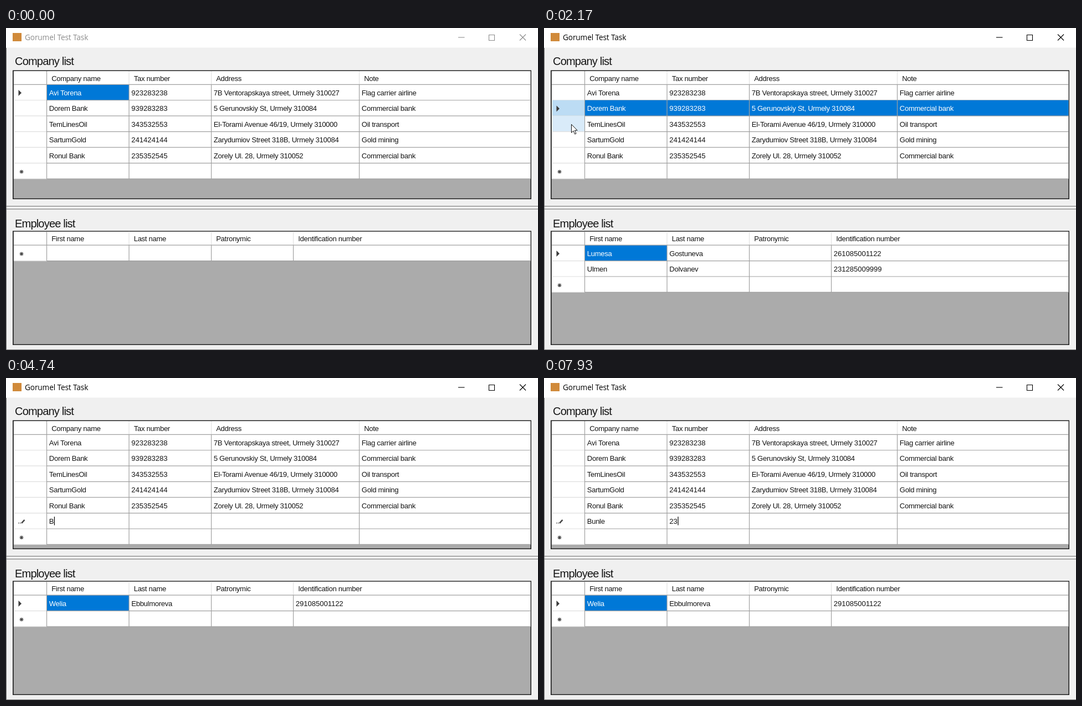
Write an HTML page that moves like this. It is 960 by 583 pixels and loops after 8 s.

```html
<!DOCTYPE html>
<html lang="en">
<head>
<meta charset="utf-8">
<title>Company and employee lists</title>
<style>
  html, body { margin: 0; width: 100%; height: 100%; overflow: hidden; background: #f0f0f0; }
  svg { display: block; width: 100vw; height: 100vh; }
  text { font: 13px "Liberation Sans", Arial, sans-serif; letter-spacing: -0.27px; fill: #141414; white-space: pre; }
  .num { letter-spacing: 0; }
  .head { font-size: 20px; letter-spacing: -0.8px; }
  .title { font: 13.6px "Open Sans", "Noto Sans", sans-serif; letter-spacing: -0.1px; }
  .on { fill: #fff; }
</style>
</head>
<body>
<svg id="stage" viewBox="0 0 960 583" preserveAspectRatio="none"></svg>
<script>
const LOOP = 8000, PITCH = 28.45, LEFT = 14, DIVIDER = 73.5, RIGHT = 946.5;
const BLUE = '#0078d7', LINE = '#a0a0a0', HOVER = '#d9ebf9', PICKED = '#bcdcf4';
const stage = document.getElementById('stage');

const companies = {
  top: 78, bottom: 309.5, cols: [DIVIDER, 222, 370.5, 637.5],
  heads: ['Company name', 'Tax number', 'Address', 'Note'],
  rows: [
    ['Avi Torena', '923283238', '7B Ventorapskaya street, Urmely 310027', 'Flag carrier airline'],
    ['Dorem Bank', '939283283', '5 Gerunovskiy St, Urmely 310084', 'Commercial bank'],
    ['TemLinesOil', '343532553', 'El-Torami Avenue 46/19, Urmely 310000', 'Oil transport'],
    ['SartumGold', '241424144', 'Zarydumiov Street 318B, Urmely 310084', 'Gold mining'],
    ['Ronul Bank', '235352545', 'Zorely Ul. 28, Urmely 310052', 'Commercial bank']
  ]
};
const staff = {
  top: 368.8, bottom: 573.5, cols: [DIVIDER, 222, 370.5, 518.5],
  heads: ['First name', 'Last name', 'Patronymic', 'Identification number']
};
const teams = [
  [],
  [['Vrena', 'Beldatova', '', '211085001122'],
   ['Belnur', 'Durbamelkeniov', '', '211285009999'],
   ['Ulmen', 'Tumerov', '', '231085001342']],
  [['Lumesa', 'Gostuneva', '', '261085001122'],
   ['Ulmen', 'Dolvanev', '', '231285009999']],
  [['Welia', 'Ebbulmoreva', '', '291085001122']]
];
const teamTimes = [[0, 0], [1100, 1], [1840, 2], [2300, 3]];

// time, row, column (-1 selects the whole row)
const picks = [[0, 0, 0], [1060, 0, -1], [1790, 1, -1], [2260, 2, -1],
  [3570, 5, 0], [5900, 6, 0], [7140, 5, 1]];

// time, text in the editor, mode
const edits = [[0, null], [4170, '', 'caret'], [4600, ''], [4740, 'B', 'caret'], [5110, 'B'],
  [5250, 'Bu', 'caret'], [5340, 'Bun', 'caret'], [5480, 'Bunl', 'caret'], [5530, 'Bunle', 'caret'],
  [5900, null], [7280, '0', 'marked'], [7740, '2', 'caret'], [7930, '23', 'caret']];

// first step, last step, number of steps, end point
const moves = [
  [180, 180, 1, 794, 560], [230, 680, 10, 28, 109], [870, 920, 2, 45, 121],
  [1560, 1700, 4, 53, 150], [2020, 2170, 4, 49, 174],
  [3190, 3190, 1, 71, 203], [3240, 3430, 5, 106, 263], [3660, 3710, 2, 111, 235], [3850, 3940, 2, 128, 245],
  [6600, 6600, 1, 128, 245], [6650, 6740, 3, 160, 272], [6790, 6900, 3, 258, 261], [6950, 7050, 3, 258, 258]
];
const shapes = [[0, 'none'], [180, 'arrow'], [4170, 'beam'], [4260, 'none'],
  [6600, 'arrow'], [7370, 'beam'], [7790, 'none']];

const at = (table, t) => table.filter(step => step[0] <= t).pop();

function pointer(t) {
  let x = 0, y = 0;
  for (const [from, to, n, endX, endY] of moves) {
    if (t < from) break;
    const done = t >= to ? n : 1 + Math.floor((t - from) / (to - from) * (n - 1) + 1e-6);
    x += (endX - x) * done / n;
    y += (endY - y) * done / n;
  }
  return { x, y, shape: at(shapes, t)[1] };
}

const box = (x, y, w, h, fill) => `<rect x="${x}" y="${y}" width="${w}" height="${h}" fill="${fill}"/>`;
const path = (d, stroke, width = 1.2, fill = 'none') =>
  `<path d="${d}" stroke="${stroke}" stroke-width="${width}" fill="${fill}"/>`;
const label = (x, y, s, cls = '') =>
  s ? `<text x="${x}" y="${y}" class="${cls}${/^\d+$/.test(s) ? ' num' : ''}">${s}</text>` : '';

const triangle = (x, y) => path(`M${x} ${y - 5}l5.5 5.5l-5.5 5.5z`, 'none', 0, '#3c3c3c');
const star = (x, y) => path(`M${x - 3.5} ${y}h7M${x} ${y - 3.5}v7M${x - 2.6} ${y - 2.6}l5.2 5.2M${x + 2.6} ${y - 2.6}l-5.2 5.2`, '#4a4a4a');
const pencil = y => box(22, y + 2.5, 1.5, 1.5, '#444') + box(25, y + 2.5, 1.5, 1.5, '#444') +
  path(`M28 ${y + 3.5}l5.5 -6`, '#444', 2.4);

function marker(kind, y) {
  if (kind === 'current') return triangle(22.5, y);
  if (kind === 'new') return star(28, y + 1);
  if (kind === 'both') return triangle(22, y) + star(31.5, y + 0.5);
  return kind === 'edit' ? pencil(y) : '';
}

function grid(g, rows, { row, col, hover = -1, edit = null, mode, marks }) {
  const first = g.top + 24.3, y = i => first + i * PITCH, end = y(rows.length);
  const edge = i => g.cols[i] ?? RIGHT;
  let out = box(12, g.top - 1.5, 936, g.bottom - g.top + 2, '#222') +
    box(LEFT - 0.3, g.top, RIGHT - LEFT + 0.2, g.bottom - g.top - 1, '#ababab') +
    box(LEFT, g.top, RIGHT - LEFT, end - g.top, '#fff');

  g.heads.forEach((s, i) => {
    out += label(g.cols[i] + 8.7, g.top + 17.5, s);
    out += path(`M${g.cols[i]} ${g.top}V${first}`, i ? '#e2e2e2' : LINE);
  });

  rows.forEach((cells, r) => {
    const whole = r === row && col < 0;
    if (whole || r === hover) out += box(LEFT + 1, y(r), DIVIDER - LEFT - 1, PITCH, whole ? PICKED : HOVER);
    out += marker(marks[r], y(r) + 14.8);
    cells.forEach((s, c) => {
      const here = r === row && (col < 0 || c === col), editing = here && edit !== null;
      const x = g.cols[c] + 4.3, on = here && !editing;
      if (on) out += box(g.cols[c], y(r), edge(c + 1) - g.cols[c], PITCH, BLUE);
      if (editing && mode === 'marked') out += box(x, y(r) + 6.5, 8, 16, BLUE);
      const text = editing ? edit : s;
      out += label(x, y(r) + 19.5, text, (on || editing && mode === 'marked' ? 'on' : '') + (editing ? ' editor' : ''));
      if (editing && mode === 'caret') out += `<rect class="caret" x="${x + 0.5}" y="${y(r) + 6.5}" width="1.2" height="15.5"/>`;
    });
    out += path(`M${LEFT + 1} ${y(r + 1)}H${DIVIDER}`, '#dedede') + path(`M${DIVIDER} ${y(r + 1)}H${RIGHT}`, LINE);
  });

  out += path(`M${LEFT} ${first}H${RIGHT}`, LINE);
  return out + g.cols.map(x => path(`M${x} ${first}V${end}`, LINE)).join('');
}

function cursor({ x, y, shape }) {
  if (shape === 'none') return '';
  let art;
  if (shape === 'beam') art = path('M-3 -8h2.3l.7 .8l.7 -.8h2.3M0 -7.2v14.4M-3 8h2.3l.7 -.8l.7 .8h2.3', '#111', 1.1);
  else if (shape === 'resize') art = path('M-9 0l5 -4.5v3h8v-3l5 4.5l-5 4.5v-3h-8v3z', '#111', 1, '#fff');
  else art = path('M.5 .5v15l3.5 -3.3l2.6 6l2.4 -1l-2.6 -5.9h4.7z', '#111', 1, '#fff');
  return `<g transform="translate(${x.toFixed(1)} ${y.toFixed(1)})">${art}</g>`;
}

function companyGrid(t, p) {
  const [, row, col] = at(picks, t), [, edit, mode] = at(edits, t);
  const rows = companies.rows.slice();
  const grown = t >= 4740;
  if (grown) rows.push(['Bunle', t >= 5950 ? '0' : '', '', '']);
  rows.push(['', '', '', '']);

  const last = rows.length - 1, marks = { [last]: 'new' };
  const typing = edit !== null && grown && mode !== 'marked';
  marks[row] = typing ? 'edit' : row === last ? 'both' : 'current';

  const inHeads = p.shape === 'arrow' && p.x > LEFT && p.x < DIVIDER;
  const under = Math.floor((p.y - companies.top - 24.3) / PITCH);
  const hover = inHeads && under >= 0 && under < rows.length ? under : -1;
  if (hover >= 0 && Math.abs(p.x - DIVIDER) < 5) p.shape = 'resize';
  return grid(companies, rows, { row, col, hover, edit, mode, marks });
}

function staffGrid(t) {
  const team = teams[at(teamTimes, t)[1]], n = team.length;
  const marks = n ? { 0: 'current', [n]: 'new' } : { 0: 'new' };
  return grid(staff, [...team, ['', '', '', '']], { row: n ? 0 : -1, col: 0, marks });
}

function chrome(active) {
  const ink = active ? '#000' : '#8c8c8c';
  return box(0, 0, 960, 583, '#f0f0f0') + box(0, 0, 960, 35.5, '#fff') +
    box(12, 9, 16, 15, '#d08a3a') +
    `<text x="34" y="22" class="title" style="fill:${ink}">Gorumel Test Task</text>` +
    path('M816 17H827.5', ink, 1.1) + path('M871.5 12.5h10v10h-10z', ink, 1.1) +
    path('M927 11.5l11 11M938 11.5l-11 11', ink, 1.1) +
    box(0, 36, 1, 547, '#6a6a6a') + box(0, 582, 960, 1, '#777') +
    box(1, 322, 959, 6, '#fafafa') + box(1, 322, 959, 1.4, '#8a8a8a') + box(1, 327, 959, 1.4, '#8a8a8a') +
    label(16, 67, 'Company list', 'head') + label(16, 361, 'Employee list', 'head');
}

let shown = '';
function draw(t) {
  const p = pointer(t);
  const scene = chrome(t >= 1060) + companyGrid(t, p) + staffGrid(t) + cursor(p);
  if (scene === shown) return;
  stage.innerHTML = shown = scene;
  const caret = stage.querySelector('.caret'), editor = stage.querySelector('.editor');
  if (caret && editor) caret.setAttribute('x', +editor.getAttribute('x') + editor.getComputedTextLength() + 0.6);
}

let start;
function tick(now) {
  start ??= now;
  draw((now - start) % LOOP);
  requestAnimationFrame(tick);
}
draw(0);
requestAnimationFrame(tick);
</script>
</body>
</html>
```
